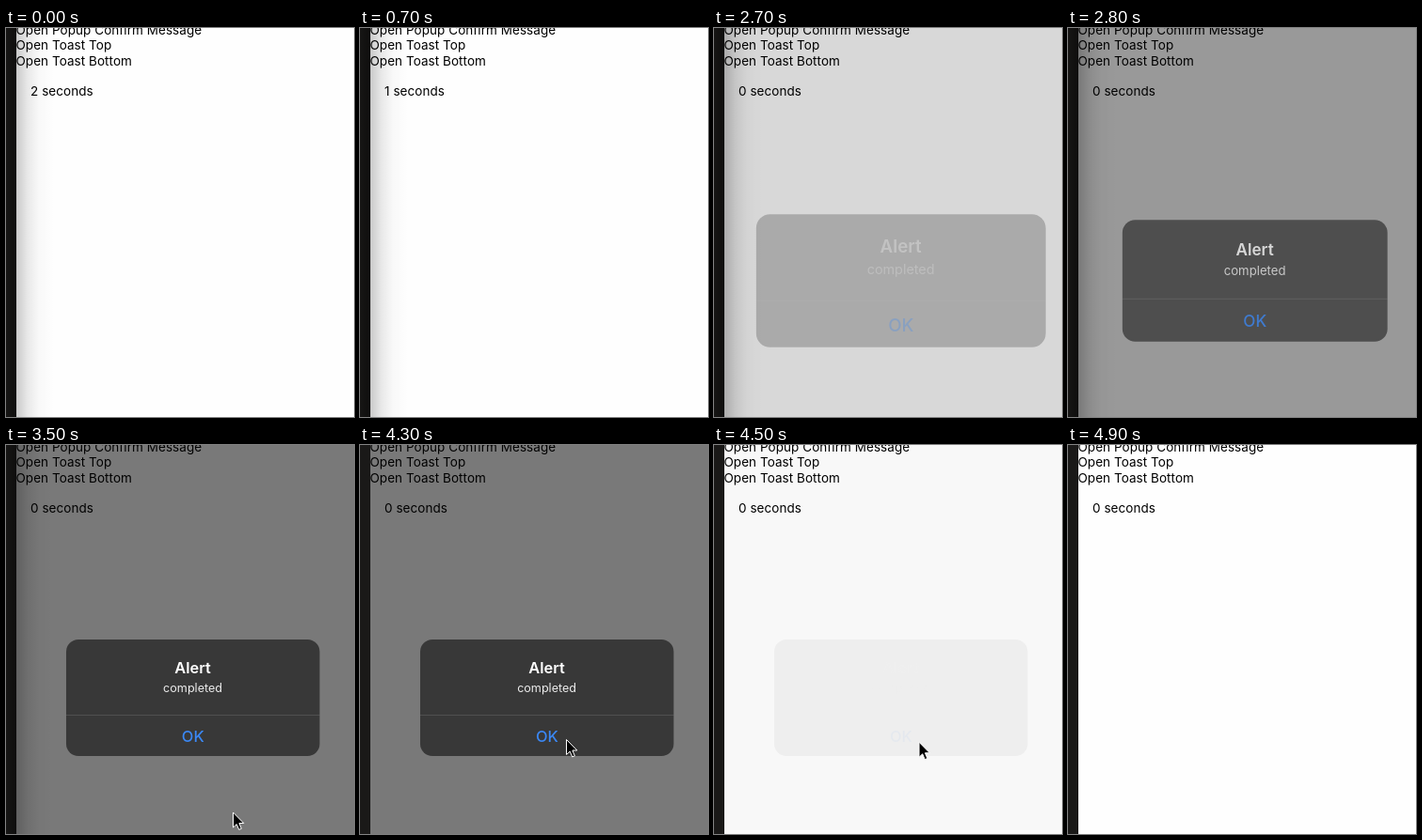
Animation of 370x414 px, one loop 5.4 s. Source, as an HTML page:

```html
<!DOCTYPE html>
<html lang="en">
<head>
<meta charset="utf-8">
<title>Countdown alert</title>
<style>
  html, body { margin: 0; width: 100%; height: 100%; overflow: hidden; background: #fff; }
  svg { display: block; width: 370px; height: 414px; font-family: Inter, sans-serif; }
  .page { font-size: 13.5px; letter-spacing: .05px; }
  .label { text-anchor: middle; }
</style>
</head>
<body>
<svg viewBox="0 0 370 414">
  <defs>
    <linearGradient id="shade">
      <stop offset="0" stop-opacity=".21"/>
      <stop offset=".3" stop-opacity=".085"/>
      <stop offset=".6" stop-opacity=".022"/>
      <stop offset="1" stop-opacity="0"/>
    </linearGradient>
    <linearGradient id="barShade">
      <stop offset="0" stop-opacity=".15"/>
      <stop offset="1" stop-opacity=".45"/>
    </linearGradient>
  </defs>

  <rect width="370" height="414" fill="#fefefe"/>
  <rect width="11" height="414" fill="#1a1918"/>
  <g id="shadow">
    <rect width="11" height="414" fill="url(#barShade)"/>
    <rect x="11" width="40" height="414" fill="url(#shade)"/>
  </g>
  <g class="page">
    <text x="10.5" y="6.5">Open Popup Confirm Message</text>
    <text x="10.5" y="23.3">Open Toast Top</text>
    <text x="10.5" y="40.1">Open Toast Bottom</text>
    <text id="counter" x="26" y="72.2"></text>
  </g>

  <rect id="dim" x="11" width="359" height="414"/>
  <g id="alert">
    <rect class="fade" x="64" y="207" width="269.5" height="124" rx="13" fill="#383838"/>
    <rect class="fade" x="64" y="287" width="269.5" height="1" fill="#fff" fill-opacity=".12"/>
    <g class="label">
      <text class="fade" x="198.6" y="243" font-size="16.4" font-weight="600" fill="#fff">Alert</text>
      <text class="fade" x="198.6" y="263" font-size="12.6" fill="#ececec">completed</text>
      <text class="fade" x="198.8" y="316" font-size="16.4" font-weight="500" fill="#3b88f5">OK</text>
    </g>
  </g>
  <path id="cursor" d="M0 0V16L3.7 12.6L6.2 18.4L8.8 17.3L6.4 11.5H11.3Z" stroke="#fff"/>
</svg>
<script>
  const LOOP = 5400;
  const TICK = 100;
  const OPEN = 2670;
  const CLOSE = 4300;
  const CLOSE_TIME = 300;
  const SHADOW_END = 4100;
  const MAX_DIM = 0.52;
  const POINTER_END = 4900;

  // The pointer overshoots the button, rests on it, then drifts away.
  const pointerPath = [
    { at: 3500, x: 241.5, y: 391 },
    { at: 3900, x: 190.5, y: 306 },
    { at: 4200, x: 219.5, y: 313.5 },
    { at: 4400, x: 219.5, y: 313.5 },
    { at: 4800, x: 210, y: 331 }
  ];

  const byId = id => document.getElementById(id);
  const clamp = u => Math.min(1, Math.max(0, u));
  const mix = (a, b, u) => a + (b - a) * u;
  const smooth = u => u * u * (3 - 2 * u);
  const fading = document.querySelectorAll('.fade');
  const startTime = performance.now();

  const secondsLeft = t => Math.max(0, 2 - Math.floor((t + 300) / 1000));

  // Spring-like approach when opening, fast ease-out when closing.
  function alertPresence(t) {
    const opened = 1 - Math.exp(-Math.max(0, t - OPEN) / 88);
    const closing = clamp((t - CLOSE) / CLOSE_TIME);
    return opened * (1 - closing) ** 2.8;
  }

  const alertScale = t => t < CLOSE ? 1 + 0.2 * (1 - alertPresence(t)) : 1;

  function pointerAt(t) {
    const next = pointerPath.findIndex(point => point.at > t);
    if (next < 0) return pointerPath.at(-1);
    const b = pointerPath[next];
    const a = pointerPath[Math.max(0, next - 1)];
    const u = a === b ? 0 : smooth((t - a.at) / (b.at - a.at));
    return { x: mix(a.x, b.x, u), y: mix(a.y, b.y, u) };
  }

  function draw() {
    const elapsed = (performance.now() - startTime) % LOOP;
    const t = Math.floor(elapsed / TICK) * TICK;
    const presence = alertPresence(t);
    const tip = pointerAt(t);
    const pointing = t >= pointerPath[0].at && t < POINTER_END;

    byId('counter').textContent = `${secondsLeft(t)} seconds`;
    byId('shadow').setAttribute('visibility', t < SHADOW_END ? 'visible' : 'hidden');
    byId('dim').setAttribute('opacity', presence * MAX_DIM);
    fading.forEach(part => part.setAttribute('opacity', presence));
    byId('alert').setAttribute('transform',
      `translate(198.6 269) scale(${alertScale(t)}) translate(-198.6 -269)`);
    byId('cursor').setAttribute('visibility', pointing ? 'visible' : 'hidden');
    byId('cursor').setAttribute('transform', `translate(${tip.x} ${tip.y})`);
    requestAnimationFrame(draw);
  }
  draw();
</script>
</body>
</html>
```
